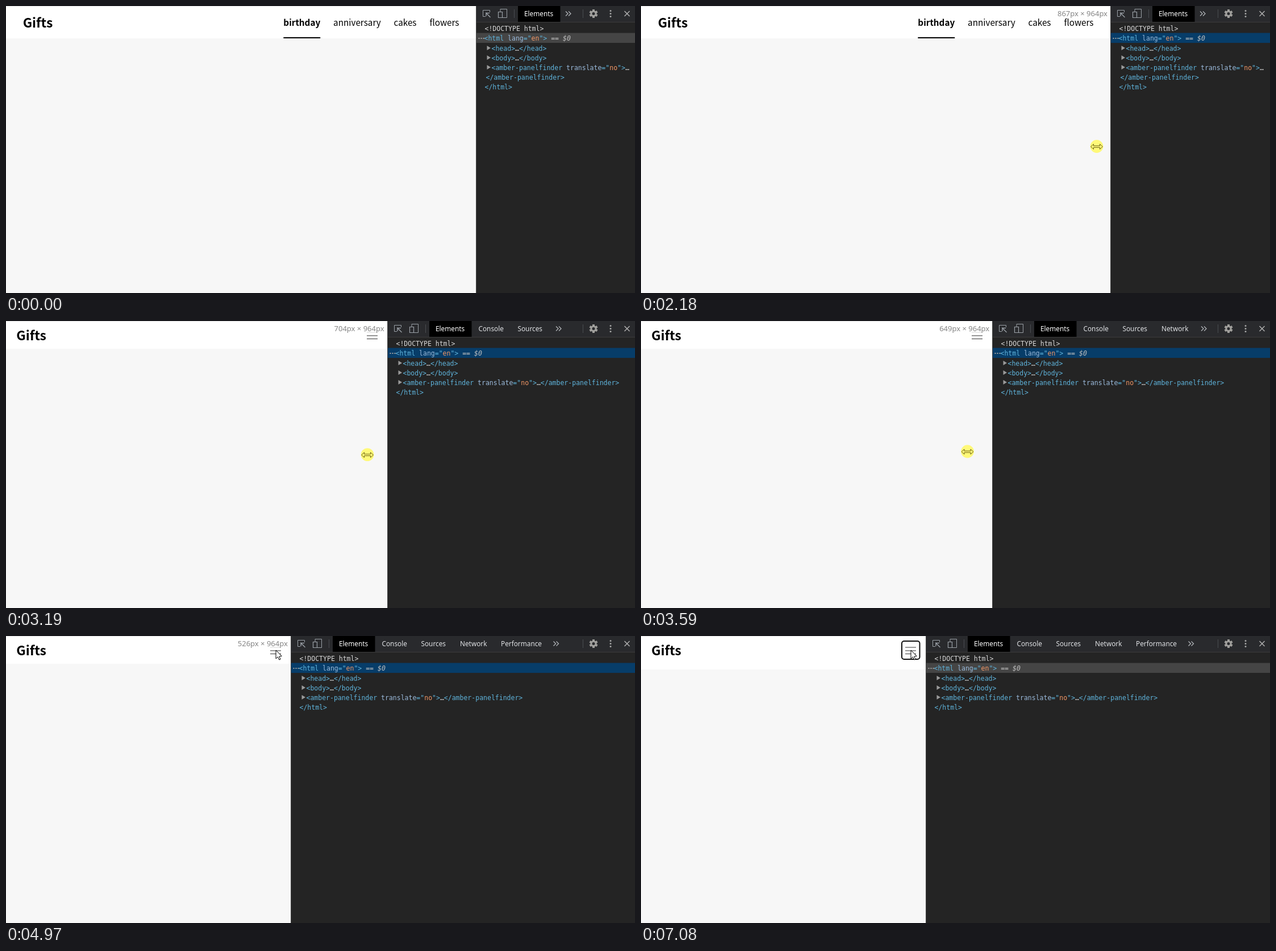
Write an HTML page with a canvas that moves like this. It is 1107 px wide and 506 px high and loops after 8 s.

```html
<!DOCTYPE html>
<html lang="en">
<head>
<meta charset="utf-8">
<title>Responsive header</title>
<style>
html, body { margin: 0; width: 100%; height: 100%; overflow: hidden; background: #f7f7f7; }
canvas { display: block; }
</style>
</head>
<body>
<canvas id="stage" width="1107" height="506"></canvas>
<script>
const c = document.getElementById('stage').getContext('2d');
const W = 1107, H = 506, LOOP = 8000, ZOOM = 1.0487;
const SANS = '"Noto Sans CJK KR", "Noto Sans CJK JP", "Noto Sans CJK SC", "Noto Sans CJK", "Noto Sans", sans-serif';
const UI = '"Noto Sans", "Open Sans", sans-serif';
const MONO = '11.5px "DejaVu Sans Mono", "Noto Sans Mono", monospace';
const LINKS = ['birthday', 'anniversary', 'cakes', 'flowers'];
const TAG = '#5fb4dc', ATTR = '#9bbbdc', VALUE = '#f29766', PLAIN = '#d8d8d8';
const ROW = 18 / ZOOM;

// screen updates: start, end, number of steps
const UPDATES = [
  [0, 0, 1], [380, 1170, 11], [1230, 1400, 3], [1780, 1780, 1], [1940, 2720, 11],
  [2800, 3590, 11], [3650, 3650, 1], [3810, 4580, 12], [4660, 5450, 11],
  [5540, 5540, 1], [6930, 6930, 1], [7080, 7080, 1]
];
// time, x, y of the pointer
const POINTER = [
  [380, 1057, 494], [780, 925, 352], [1170, 836, 263], [1230, 831, 256], [1400, 830, 250.5],
  [1900, 829.5, 250.5], [2174, 802, 248], [2720, 710, 243], [3590, 574.5, 230.5],
  [3650, 525, 226], [3950, 503, 223], [4300, 503, 223], [4580, 485, 110], [4890, 474.5, 24.5]
];
const DIVIDER = [
  [2096, 828], [2174, 827], [2720, 734.5], [3590, 619.2], [3650, 580],
  [3810, 548], [3950, 517.2], [4090, 501.8]
];

function snap(t) {
  const [a, b, n] = UPDATES.filter(u => u[0] <= t).pop();
  if (n === 1) return a;
  const step = (b - a) / (n - 1);
  return a + Math.min(n - 1, Math.floor((t - a + 8) / step)) * step;
}

function track(keys, t, i = 1) {
  if (t <= keys[0][0]) return keys[0][i];
  for (let k = 1; k < keys.length; k++) {
    const p = keys[k - 1], q = keys[k];
    if (t < q[0]) return p[i] + (q[i] - p[i]) * (t - p[0]) / (q[0] - p[0]);
  }
  return keys[keys.length - 1][i];
}

function rect(x, y, w, h, color) {
  c.fillStyle = color;
  c.fillRect(x, y, w, h);
}

function text(s, x, y, font, color, align = 'left') {
  c.font = font;
  c.fillStyle = color;
  c.textAlign = align;
  c.fillText(s, x, y);
}

function line(points, color, width = 1, close = false) {
  c.beginPath();
  points.forEach(([x, y]) => c.lineTo(x, y));
  if (close) c.closePath();
  c.strokeStyle = color;
  c.lineWidth = width;
  c.stroke();
}

function dot(x, y, r, color) {
  c.fillStyle = color;
  c.beginPath();
  c.arc(x, y, r, 0, 7);
  c.fill();
}

function linkFont(i) {
  return (i ? '' : 'bold ') + '15.26px ' + SANS;
}

function drawPage(t, w) {
  const mobile = Math.round(w * ZOOM) < 768;
  const open = t >= 5280 && t < 7080;
  const grow = Math.min(1, (t - 5200) / 340);
  const head = !mobile ? 57 : open ? 49 + 196 * grow : t >= 7080 ? 59 : 49;
  rect(0, 0, W, H, '#f7f7f7');
  rect(0, 0, w, head, '#fff');
  rect(0, 0, w, 1, '#e6e6e6');
  text('Gifts', mobile ? 18.3 : 29.7, mobile ? 34 : 38, 'bold 22.9px ' + SANS, '#000');

  if (mobile) {
    for (const y of [19.5, 25.4, 31]) rect(Math.round(w - 37), y, 19, 1, '#333');
    if (t >= 5280) {
      c.beginPath();
      c.roundRect(w - 42.8, 9, 31.5, 32, 4);
      c.strokeStyle = '#111';
      c.lineWidth = 2;
      c.stroke();
    }
    if (open) {
      c.globalAlpha = grow;
      LINKS.forEach((s, i) => text(s, 17.5, 85 + i * 45.8, linkFont(i), '#000'));
      c.globalAlpha = 1;
    }
  } else {
    let x = w - 30.5;
    for (let i = LINKS.length - 1; i >= 0; i--) {
      c.font = linkFont(i);
      const size = c.measureText(LINKS[i]).width;
      x -= size;
      text(LINKS[i], x, 35, linkFont(i), '#000');
      if (!i) rect(x, 55, size, 2, '#000');
      x -= 22.9;
    }
  }

  if (t >= 2170 && t < 5045) {
    rect(w - 96, 1, 96, 21, 'rgba(255,255,255,.8)');
    text(Math.round(w * ZOOM) + 'px × 964px', w - 6, 17.5, '13px ' + UI, '#858585', 'right');
  }
}

function drawToolbar(d) {
  const icon = '#9aa0a6';
  rect(d, 0, W - d, 28, '#292a2d');
  rect(d, 28, W - d, 1, '#3c3c3c');

  // element picker
  line([[d + 16, 18.5], [d + 11.5, 18.5], [d + 11.5, 7.5], [d + 23.5, 7.5], [d + 23.5, 11]], icon);
  line([[d + 24.5, 20], [d + 17, 12.5], [d + 17, 18]], icon, 1.4);
  line([[d + 17, 12.5], [d + 23, 12.5]], icon, 1.4);
  // device toggle
  line([[d + 42, 10], [d + 42, 5.5], [d + 53.5, 5.5], [d + 53.5, 20.5], [d + 46, 20.5]], icon);
  line([[d + 38.5, 10.5], [d + 45.5, 10.5], [d + 45.5, 20.5], [d + 38.5, 20.5]], icon, 1.2, true);

  rect(d + 66, 6, 1, 15, '#494c50');
  rect(1015, 6, 1, 15, '#494c50');

  const names = ['Elements', 'Console', 'Sources', 'Network', 'Performance'];
  const starts = [84, 159.5, 228.5, 297, 369];
  const ends = [161, 231, 300, 371, 465.5];
  const count = Math.max(1, ends.filter(e => d + e <= 996).length);
  rect(d + 73, 0, 74.5, 28, '#000');
  for (let i = 0; i < count; i++) {
    text(names[i], d + starts[i], 18, '11.8px ' + UI, i ? '#e0e2e5' : '#fff');
  }
  const more = d + ends[count - 1];
  for (const x of [more - 4, more + 1]) {
    line([[x, 9.5], [x + 4, 13.5], [x, 17.5]], '#b0b4b8', 1.3);
  }

  // gear
  c.save();
  c.translate(1034, 13.5);
  c.fillStyle = '#a09f9c';
  for (let i = 0; i < 6; i++) {
    c.rotate(Math.PI / 3);
    c.fillRect(-2, -7.5, 4, 5);
  }
  dot(0, 0, 5.6, '#a09f9c');
  dot(0, 0, 2.5, '#292a2d');
  c.restore();

  for (const y of [8.5, 13.5, 18.5]) dot(1064, y, 1.5, '#a5a5a5');
  line([[1088.5, 9], [1097.5, 18]], '#b0b0b0', 1.5);
  line([[1097.5, 9], [1088.5, 18]], '#b0b0b0', 1.5);
}

function baseline(row) {
  return Math.round(44.2 + row * ROW);
}

function code(x, row, parts) {
  for (const [color, s] of parts) {
    text(s, x, baseline(row), MONO, color);
    x += c.measureText(s).width;
  }
  return x;
}

function drawTree(d, t) {
  rect(d, 47.5, W - d, 17.5, t >= 2010 && t < 5120 ? '#073d69' : '#454545');
  const x = d + 14.5, inner = d + 26.5;
  code(x, 0, [[PLAIN, '<!DOCTYPE html>']]);
  for (let i = 0; i < 3; i++) rect(d + 3.5 + i * 4, 56, 2, 2, '#a0a0a0');
  const end = code(d + 13.5, 1, [[TAG, '<html'], [ATTR, ' lang'], [TAG, '="'], [VALUE, 'en'], [TAG, '">']]);
  text(' == $0', end, baseline(1), 'italic ' + MONO, '#c0c0c0');
  ['head', 'body'].forEach((s, i) => {
    code(inner, 2 + i, [[TAG, `<${s}>`], [PLAIN, '…'], [TAG, `</${s}>`]]);
  });

  // the closing tag wraps with the panel width
  const fit = d <= 680 ? ['</amber-panelfinder>', '']
    : d <= 765 ? ['</amber-', 'panelfinder>'] : ['', '</amber-panelfinder>'];
  code(inner, 4, [[TAG, '<amber-panelfinder'], [ATTR, ' translate'], [TAG, '="'], [VALUE, 'no'],
    [TAG, '">'], [PLAIN, '…'], [TAG, fit[0]]]);
  if (fit[1]) code(d + 16.5, 5, [[TAG, fit[1]]]);
  code(x, fit[1] ? 6 : 5, [[TAG, '</html>']]);

  c.fillStyle = '#9a9a9a';
  for (const row of [2, 3, 4]) {
    const y = baseline(row) - 5;
    c.beginPath();
    c.moveTo(d + 18.5, y - 4);
    c.lineTo(d + 25, y);
    c.lineTo(d + 18.5, y + 4);
    c.fill();
  }
}

function outline(points, fill, stroke) {
  c.beginPath();
  points.forEach(([x, y]) => c.lineTo(x, y));
  c.closePath();
  c.fillStyle = fill;
  c.fill();
  c.strokeStyle = stroke;
  c.lineWidth = 1;
  c.stroke();
}

function drawPointer(t) {
  if (t < 380) return;
  const pressed = t >= 1780 && t < 4110 || t >= 5120 && t < 5280 || t >= 6930 && t < 7080;
  c.save();
  c.translate(track(POINTER, t), track(POINTER, t, 2));
  if (pressed) dot(0, -0.5, 11.4, 'rgba(255,248,110,.92)');
  const fill = pressed ? '#fff97c' : '#fff', stroke = pressed ? '#6b6110' : '#000';
  if (t >= 1230 && t < 4310) {
    const half = [[-10.5, 0], [-5.5, -4.5], [-5.5, -1.4]];
    const top = half.concat(half.map(([x, y]) => [-x, y]).reverse());
    outline(top.concat(top.map(([x, y]) => [x, -y]).reverse()), fill, stroke);
  } else {
    outline([[0.5, 0.5], [0.5, 15.5], [3.9, 12.3], [6.3, 17.5], [8.6, 16.5], [6.3, 11.5], [10.7, 11]], fill, stroke);
  }
  c.restore();
}

function draw(now) {
  const t = snap(now % LOOP);
  const edge = track(DIVIDER, t);
  const d = Math.round(edge);
  // the page repaints late once during the drag
  drawPage(t, t >= 3650 && t < 3810 ? 619.2 : edge);
  rect(d, 0, W - d, H, '#242424');
  rect(d - 1, 0, 1, H, '#4a4a4a');
  drawToolbar(d);
  drawTree(d, t);
  drawPointer(t);
}

const start = performance.now();
function loop() {
  draw(performance.now() - start);
  requestAnimationFrame(loop);
}
loop();
</script>
</body>
</html>
```
